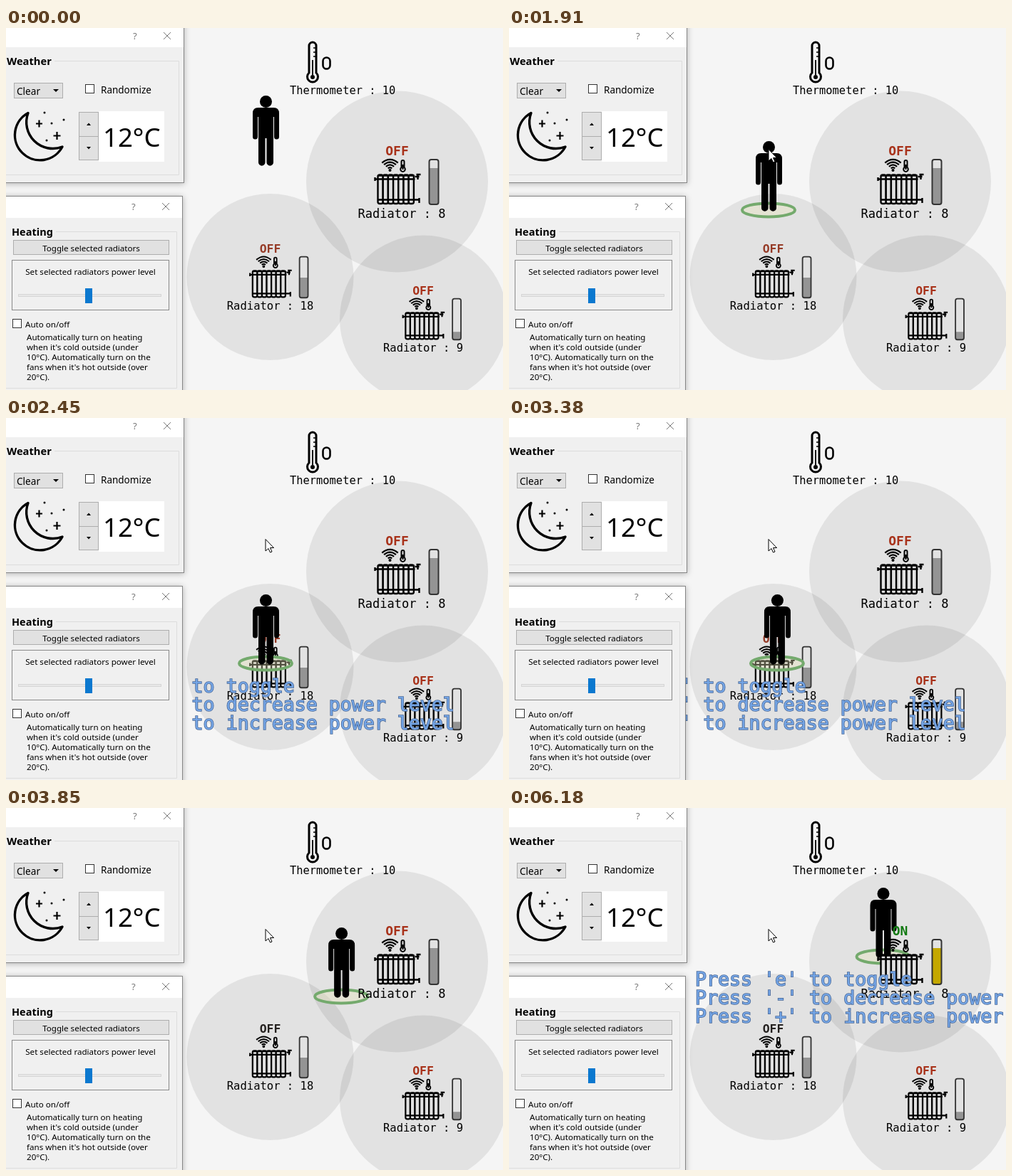
An HTML page for the animation above (8000 ms loop, 697x509 px).

```html
<!DOCTYPE html>
<html lang="en">
<head>
<meta charset="utf-8">
<title>Heating simulator</title>
<style>
  html, body { margin: 0; width: 100%; height: 100%; overflow: hidden; background: #f5f5f5; }
  svg { display: block; }
  text { font-family: "Noto Sans", "Open Sans", sans-serif; font-size: 11.6px; white-space: pre; }
  .mono, .state, .prompt text { font-family: "DejaVu Sans Mono", monospace; }
  .state { font-size: 18px; font-weight: bold; text-anchor: middle; }
  .prompt text { font-size: 26.6px; fill: #74a5e6; stroke: #4a6896; stroke-width: 1.6px; paint-order: stroke; }
  .line { fill: none; stroke: #000; }
  .window { fill: #f0f0f0; stroke: #858585; filter: drop-shadow(0 1px 4px rgba(0,0,0,.28)); }
  .button { fill: #e1e1e1; stroke: #adadad; }
  .check { fill: #fff; stroke: #333; }
  .group { fill: none; stroke: #dcdcdc; }
  .title { font-size: 14.7px; font-weight: bold; }
  .hint { font-size: 13px; fill: #777; }
</style>
</head>
<body>
<svg width="697" height="509" viewBox="0 0 697 509">
  <g fill-opacity=".08">
    <circle cx="370.5" cy="350" r="117"/>
    <circle cx="548.5" cy="216" r="127.5"/>
    <circle cx="585.5" cy="409" r="117.5"/>
  </g>

  <g class="line" stroke-width="3">
    <path d="M425 63V25a5 5 0 0 1 10 0V63a7.5 7.5 0 1 1 -10 0Z"/>
    <path d="M430 45V66" stroke-width="2"/>
    <path d="M431 28h4M431 34h4M431 40h4" stroke-width="1.500"/>
    <circle cx="430" cy="69" r="3" fill="#000" stroke="none"/>
    <rect x="444.5" y="41.500" width="10" height="16" rx="5" stroke-width="2.600"/>
  </g>
  <text class="mono" x="398" y="93" style="font-size:15.4px">Thermometer : 10</text>

  <g id="back"></g>

  <g id="person">
    <ellipse id="ring" cx="-.5" cy="97" rx="37" ry="9.5" fill="#e8e4b8" fill-opacity=".35" stroke="#74aa6d" stroke-width="4"/>
    <circle cy="8.500" r="8.500"/>
    <path d="M-11 17H11Q18.500 17 18.500 25V58a3.500 3.500 0 0 1 -7 0V30H10.500V94a4.700 4.700 0 0 1 -9.500 0V60H-1V94a4.700 4.700 0 0 1 -9.500 0V30H-11.500V58a3.500 3.500 0 0 1 -7 0V25Q-18.500 17 -11 17Z"/>
  </g>

  <g id="front"></g>

  <g id="prompt" class="prompt">
    <text y="138">Press 'e' to toggle</text>
    <text y="164">Press '-' to decrease power level</text>
    <text y="189.5">Press '+' to increase power level</text>
  </g>

  <!-- weather window -->
  <rect class="window" x="-9.5" y="-9.5" width="259" height="227"/>
  <rect width="249" height="27" fill="#fff"/>
  <text class="hint" x="178" y="16">?</text>
  <path d="M221 6l10 10m0-10l-10 10" class="line" style="stroke:#777"/>
  <path class="group" d="M68 46.500H242.500V206.500H0"/>
  <text class="title" x="1" y="52">Weather</text>
  <rect class="button" x="11.500" y="77.500" width="68" height="21"/>
  <text x="15" y="93.500" style="font-size:13.6px">Clear</text>
  <path d="M66 86h8l-4 4Z"/>
  <rect class="check" x="111.500" y="79.500" width="12" height="12"/>
  <text x="133" y="92" style="font-size:13.5px">Randomize</text>
  <path class="line" stroke-width="3.400" stroke-linejoin="round" d="M31 119.500A35.300 35.300 0 1 0 79 167A37 37 0 0 1 31 119.500Z"/>
  <path class="line" stroke-width="2.200" d="M42 134.500h9m-4.500-5v10M66.500 151.500h10m-5-5.500v11"/>
  <circle cx="54" cy="119" r="1.500"/><circle cx="64" cy="134" r="1.500"/>
  <circle cx="81" cy="129" r="1.500"/><circle cx="57" cy="158" r="1.500"/>
  <rect x="130" y="117" width="92" height="71" fill="#fff"/>
  <rect class="button" x="102.500" y="118.500" width="27" height="34"/>
  <rect class="button" x="102.500" y="152.500" width="27" height="33"/>
  <path d="M113 137h6l-3-3.500ZM113 167h6l-3 3.500Z"/>
  <text x="136" y="167" style="font-size:36.5px">12°C</text>

  <!-- heating window -->
  <rect class="window" x="-9.5" y="236.5" width="257" height="300"/>
  <rect y="237" width="247" height="30" fill="#fff"/>
  <text class="hint" x="176" y="256">?</text>
  <path d="M219 246l10 10m0-10l-10 10" class="line" style="stroke:#777"/>
  <path class="group" d="M70 286.500H239.500V506.500H0"/>
  <text class="title" x="8" y="292" style="font-size:14.5px">Heating</text>
  <rect class="button" x="10.500" y="298.500" width="218" height="20"/>
  <text x="119.500" y="313.500" text-anchor="middle">Toggle selected radiators</text>
  <rect x="8.500" y="326.500" width="220" height="70" fill="none" stroke="#8a8a8a"/>
  <text x="118.500" y="347" text-anchor="middle">Set selected radiators power level</text>
  <rect x="17.500" y="374.500" width="200" height="3" fill="#e7e7e7" stroke="#d6d6d6"/>
  <rect x="111" y="366" width="10" height="21" fill="#0b78cf"/>
  <rect class="check" x="9.500" y="409.500" width="12" height="12"/>
  <text x="27" y="421">Auto on/off</text>
  <g id="about"></g>

  <path id="cursor" d="M0 0V16.500L4 13L6.500 18.500L9 17.500L6.500 12H11.500Z" fill="#fff" stroke="#000"/>
</svg>

<script>
const $ = id => document.getElementById(id);
const clamp = (v, lo, hi) => Math.min(hi, Math.max(lo, v));

// level: fill height of the gauge, labelX: label centre relative to the icon
function radiator(id, x, y, scale, value, level, labelX) {
  let fins = "", waves = "";
  for (let i = 0; i < 7; i++)
    fins += `<rect x="${-27 + i * 7.2}" y="-9.5" width="7.2" height="40.5" rx="2.5" fill="#e1e1e1"/>`;
  for (let i = 1; i < 5; i++)
    waves += `M${-10 - i * 2.8} ${-16 - i * 2.6}q${i * 2.8} ${-i * 2.4} ${i * 5.6} 0`;
  return `<g transform="translate(${x} ${y}) scale(${scale})">
    <text id="state${id}" class="state" y="-37" fill="#a8321a">OFF</text>
    <g class="line" stroke-width="2.4">
      <path d="${waves}" stroke-width="2.2"/>
      <circle cx="-10" cy="-16" r="2" fill="#000" stroke="none"/>
      <path d="M6 -20V-28a2 2 0 0 1 4 0V-20a3.300 3.300 0 1 1 -4 0ZM8 -24V-17" stroke-width="2"/>
      ${fins}
      <path d="M-27 -8.500H24M-31 -3.500H25M-27 25.500H31M25 -7H31M27 -10H33M29 -10V-3M31 23V30M-31 -6V-1"/>
    </g>
    <rect x="45" y="-31" width="13" height="63" rx="3" fill="#e2e2e2"/>
    <rect id="gauge${id}" x="45" y="${32 - level}" width="13" height="${level}" rx="1" fill="#949494"/>
    <rect x="45" y="-31" width="13" height="63" rx="3" class="line" stroke-width="2" style="stroke:#333"/>
    <text class="mono" x="${labelX}" y="50.5" text-anchor="middle" style="font-size:17px">Radiator : ${value}</text>
  </g>`;
}

$("back").innerHTML = radiator(1, 370.5, 350, .914, 18, 31, 0) + radiator(3, 585, 409, .914, 9, 12, 0);
$("front").innerHTML = radiator(2, 548.5, 216, 1, 8, 51, 6.5);
$("about").innerHTML = [
  "Automatically turn on heating",
  "when it's cold outside (under",
  "10°C). Automatically turn on the",
  "fans when it's hot outside (over",
  "20°C)."
].map((s, i) => `<text x="29" y="${439 + i * 14}">${s}</text>`).join("");

const sensors = [[310, 305, 431, 396], [494, 165, 615, 268]];
const touches = (x, y) => sensors.some(([l, t, r, b]) =>
  x + 19 > l && x - 19 < r && y + 98 > t && y < b);

const move = (el, x, y) => el.setAttribute("transform", `translate(${x} ${y})`);
const show = (el, on) => el.setAttribute("visibility", on ? "visible" : "hidden");

function draw(t) {
  const n = Math.floor((t + 14) / 76.9);   // picture rate of about 13 per second

  // walk down, then right and up
  const x = 364.5 + clamp(15.7 * (n - 43.24), 0, 160.5);
  const y = 95 + clamp(14.2 * (n - 20.5), 0, 153) - clamp(15.7 * (n - 44.9), 0, 136);
  move($("person"), x, y);
  show($("ring"), n >= 10);
  move($("prompt"), x - 264, y);
  show($("prompt"), touches(x, y));

  const p = clamp((n - 1) / 10, 0, 1), e = p * p * (3 - 2 * p);
  const settle = clamp((n - 11) / 2, 0, 1);
  move($("cursor"), 603 - 234 * e - 5 * settle, 421 - 255 * e + 4.5 * settle);
  show($("cursor"), n >= 1);

  $("state1").setAttribute("fill", n < 45 ? "#963c28" : "#262220");
  const on = t >= 6180;
  $("state2").textContent = on ? "ON" : "OFF";
  $("state2").setAttribute("fill", on ? "#137a13" : "#a8321a");
  $("gauge2").setAttribute("fill", on ? "#c4a800" : "#949494");
}

const start = performance.now();
function tick() {
  draw((performance.now() - start) % 8000);
  requestAnimationFrame(tick);
}
tick();
</script>
</body>
</html>
```
